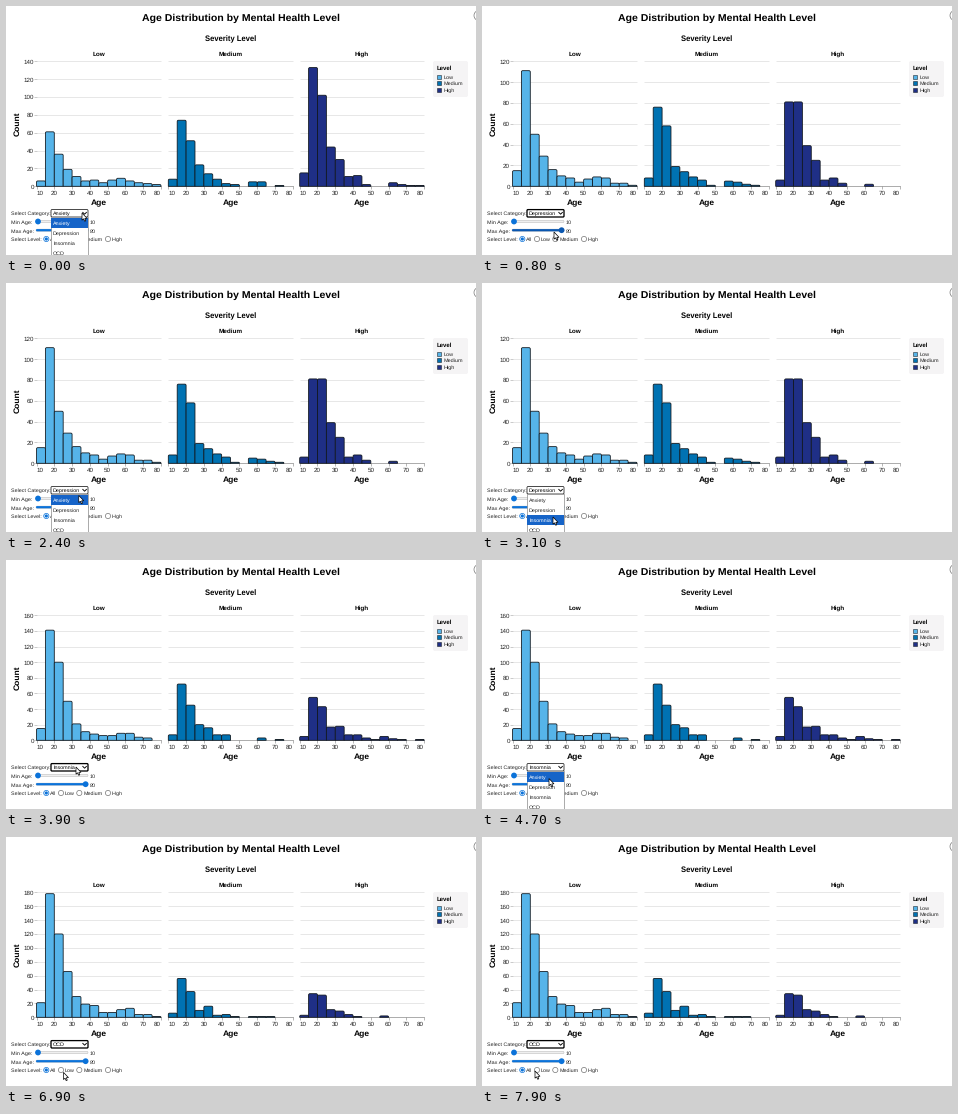
Write a matplotlib script that moves like this. It is 470 px wide and 249 px high and loops after 8 s.

```python
import numpy as np
import matplotlib.pyplot as plt
from matplotlib.animation import FuncAnimation
from matplotlib.collections import LineCollection, PathCollection
from matplotlib.patches import Circle, FancyBboxPatch, Polygon, Rectangle
from matplotlib.path import Path

W, H, DPI = 470, 249, 100
STEP, LOOP = 100, 8000
plt.rcParams.update({"font.family": "Liberation Sans", "text.hinting": "none",
                     "toolbar": "None"})

LEVELS = ["Low", "Medium", "High"]
COLORS = ["#56b4e9", "#0072b2", "#1f2f86"]
PANELS = [30.5, 162.3, 293.7]
PANEL_W, TOP, BASE = 124.5, 55.3, 180.3
BLUE, DARK_BLUE = "#0b72d9", "#0a57b0"

# category: (axis maximum, counts per five-year bin for each level)
DATA = {
    "Anxiety": (140, [[6, 61, 36, 19, 11, 6, 7, 4, 7, 9, 6, 4, 3, 2],
                      [8, 74, 51, 24, 14, 8, 3, 2, 0, 5, 5, 0, 1],
                      [15, 133, 102, 44, 30, 11, 12, 2, 0, 0, 4, 2, 1, 1]]),
    "Depression": (120, [[15, 111, 50, 29, 16, 10, 8, 4, 7, 9, 8, 3, 3, 1],
                         [8, 76, 58, 19, 14, 9, 6, 1, 0, 5, 4, 2, 1],
                         [6, 81, 81, 39, 25, 6, 8, 3, 0, 0, 2]]),
    "Insomnia": (160, [[15, 141, 100, 50, 21, 11, 8, 6, 6, 9, 9, 4, 3],
                       [7, 72, 45, 20, 16, 7, 7, 0, 0, 0, 3, 0, 1],
                       [5, 55, 43, 17, 18, 7, 7, 3, 1, 5, 2, 1, 0, 1]]),
    "OCD": (180, [[21, 178, 120, 66, 30, 19, 17, 7, 7, 11, 13, 4, 4, 1],
                  [6, 56, 37, 10, 16, 3, 4, 1, 0, 1, 1, 1],
                  [3, 34, 32, 11, 9, 4, 1, 0, 0, 2]]),
}
NAMES = list(DATA)

# times (ms) at which the selection changes, and when the list is open
PICKS = [(0, "Anxiety"), (400, "Depression"), (3300, "Insomnia"), (5500, "OCD")]
OPEN = [(0, 400), (2200, 3300), (4200, 5500)]
# pointer path: time, x, y
MOVES = [(0, 76, 207), (100, 76, 208), (300, 74, 224), (400, 73.5, 224),
         (600, 72, 228), (800, 72, 226), (1300, 72, 226), (1900, 73, 207),
         (2200, 73, 207), (2800, 72, 228), (3100, 71, 234), (3300, 71, 234),
         (3900, 70, 207), (4200, 69, 207), (4700, 67, 218.5), (5200, 68, 238),
         (5500, 68, 243), (6200, 68, 243), (7000, 57, 235), (7900, 53, 234)]

fig = plt.figure(figsize=(W / DPI, H / DPI), dpi=DPI, facecolor="white")
ax = fig.add_axes([0, 0, 1, 1])
ax.set(xlim=(0, W), ylim=(H, 0))
ax.axis("off")


def text(x, y, s, size, bold=False, ha="left", color="#222222", z=3):
    """Text with its capitals centred on y; size in pixels."""
    return ax.text(x, y + 0.35 * size, s, size=size * 72 / DPI, ha=ha,
                   va="baseline", color=color, zorder=z,
                   weight="bold" if bold else "normal")


def px(width):
    return width * 72 / DPI


def add(artist):
    ax.add_artist(artist)
    return artist


def rounded(x, y, w, h, r, z=3, **style):
    box = FancyBboxPatch((x, y), w, h, zorder=z,
                         boxstyle=f"round,pad=0,rounding_size={r}", **style)
    return add(box)


def bar_path(x, y, w):
    r = min(1.3, BASE - y)
    verts = [(x, BASE), (x, y + r), (x, y), (x + r, y), (x + w - r, y),
             (x + w, y), (x + w, y + r), (x + w, BASE), (x, BASE)]
    codes = [Path.MOVETO, Path.LINETO, Path.CURVE3, Path.CURVE3, Path.LINETO,
             Path.CURVE3, Path.CURVE3, Path.LINETO, Path.CLOSEPOLY]
    return Path(verts, codes)


def build_chart(top, levels):
    """Grid, tick labels and bars of one category."""
    group = []
    ticks = np.arange(0, top + 1, 20)
    ys = BASE - (BASE - TOP) * ticks / top
    grid = [[(x, y), (x + PANEL_W, y)] for x in PANELS for y in ys]
    marks = [[(28.3, y), (30.5, y)] for y in ys]
    group.append(add(LineCollection(grid, colors="#dedede", linewidths=px(0.7), zorder=1)))
    group.append(add(LineCollection(marks, colors="#999999", linewidths=px(0.5), zorder=1)))
    group += [text(27.8, y + 0.2, str(t), 6.3, ha="right") for t, y in zip(ticks, ys)]
    bw = PANEL_W / 14
    for x0, color, counts in zip(PANELS, COLORS, levels):
        paths = [bar_path(x0 + i * bw, BASE - (BASE - TOP) * n / top, bw)
                 for i, n in enumerate(counts) if n]
        group.append(add(PathCollection(paths, facecolors=color, edgecolors="#10161c",
                                        linewidths=px(0.8), zorder=2)))
    return group


def build_frame():
    """Titles, x axes and legend."""
    text(234.5, 10.8, "Age Distribution by Mental Health Level", 10.45, True, "center", "black")
    text(224.5, 32.2, "Severity Level", 7.6, True, "center", "black")
    add(Circle((473, 9.5), 5, fc="white", ec="#777777", lw=px(0.7)))
    for x0, level in zip(PANELS, LEVELS):
        mid = x0 + PANEL_W / 2
        text(mid, 47.8, level, 6.4, True, "center", "black")
        text(mid, 196.2, "Age", 8.5, True, "center", "black")
        xs = x0 + PANEL_W * np.arange(8) / 7
        ax.plot([x0, x0 + PANEL_W], [BASE, BASE], color="#888888", lw=px(0.6), zorder=1.5)
        add(LineCollection([[(x, BASE), (x, BASE + 2.4)] for x in xs],
                           colors="#888888", linewidths=px(0.6)))
        for i, x in enumerate(xs):
            ha = {0: "left", 7: "right"}.get(i, "center")
            text(x, 187.2, str(10 * i + 10), 6.3, ha=ha)
    ax.text(11.7, 118, "Count", size=px(8.5), weight="bold", rotation=90,
            ha="center", va="center", color="black")
    rounded(427, 55, 35, 36, 2, 1, fc="#f5f4f5", ec="none")
    text(431, 62.2, "Level", 6, True, color="black")
    for i, (level, color) in enumerate(zip(LEVELS, COLORS)):
        y = 70.8 + 6.6 * i
        add(Rectangle((431.2, y - 2), 4, 4, fc=color, ec="#10161c", lw=px(0.5), zorder=3))
        text(438, y, level, 5.5)


def slider(y, label, value, at):
    """Range input; returns the parts that recolour on hover."""
    text(5, y + 0.8, label, 5.5)
    text(83.5, y + 0.8, value, 5.5)
    rounded(30, y - 1.1, 52, 2.2, 1.1, 3, fc="#efefef", ec="#aaaaaa", lw=px(0.4))
    fill = rounded(30, y - 1.1, max(at - 30, 2.3), 2.2, 1.1, 4, fc=BLUE, ec="none")
    return [fill, add(Circle((at, y), 2.9, fc=BLUE, ec="none", zorder=5))]


def radio(x, label, on):
    add(Circle((x, 233), 2.6, fc="white", ec=BLUE if on else "#777777",
               lw=px(0.7), zorder=3))
    if on:
        add(Circle((x, 233), 1.6, fc=BLUE, ec="none", zorder=4))
    text(x + 3.8, 233.2, label, 5.4)


build_frame()
charts = {name: build_chart(*DATA[name]) for name in NAMES}

text(5, 207.3, "Select Category:", 5.35)
select = rounded(45, 203.6, 37, 7.4, 1, fc="white", ec="black")
chosen = text(47, 207.4, "", 5.4, color="black", z=4)
ax.plot([76.8, 78.6, 80.4], [206.4, 208.2, 206.4], color="black", lw=px(0.9), zorder=4)
slider(215.5, "Min Age:", "10", 32)
max_parts = slider(224.2, "Max Age:", "80", 79.6)
text(5, 233.2, "Select Level:", 5.4)
for x, label in zip([40.3, 55, 73.3, 102], ["All"] + LEVELS):
    radio(x, label, label == "All")

menu = [add(Rectangle((45, 211.3), 37, 45, fc="white", ec="#8a8a8a", lw=px(0.7), zorder=6))]
mark = add(Rectangle((45.3, 211.6), 36.4, 9.9, fc="#1664c8", ec="none", zorder=7))
menu.append(mark)
items = [text(47, 216.7 + 10 * i, name, 5.4, z=8) for i, name in enumerate(NAMES)]
menu += items

ARROW = np.array([(0, 0), (0, 7.2), (1.6, 5.8), (2.7, 8.3), (3.8, 7.8),
                  (2.8, 5.4), (5, 5.3)])
pointer = add(Polygon(ARROW, fc="white", ec="black", lw=px(0.7), zorder=10))


def pointer_at(t):
    """Smooth start and stop between the path's points."""
    times, xs, ys = np.array(MOVES, float).T
    i = int(np.clip(np.searchsorted(times, t, "right") - 1, 0, len(times) - 2))
    u = np.clip((t - times[i]) / (times[i + 1] - times[i]), 0, 1)
    u = u * u * (3 - 2 * u)
    return xs[i] + (xs[i + 1] - xs[i]) * u, ys[i] + (ys[i + 1] - ys[i]) * u


def update(k):
    t = k * STEP
    x, y = pointer_at(t)
    current = [name for start, name in PICKS if t >= start][-1]
    is_open = any(a <= t < b for a, b in OPEN)

    for name, group in charts.items():
        for artist in group:
            artist.set_visible(name == current)
    chosen.set_text(current)
    select.set_linewidth(px(0.7 if is_open else 1.3))

    row = NAMES.index(current)
    if y > 211.5:
        row = min(int((y - 211.5) // 10), 3)
    mark.set_y(211.6 + 10 * row)
    for artist in menu:
        artist.set_visible(is_open)
    for i, item in enumerate(items):
        item.set_color("white" if i == row else "#222222")

    hover = not is_open and 30 < x < 83 and 221 < y < 227.5
    for part in max_parts:
        part.set_facecolor(DARK_BLUE if hover else BLUE)
    pointer.set_xy(ARROW + (x, y))
    return []


anim = FuncAnimation(fig, update, frames=LOOP // STEP, interval=STEP,
                     init_func=lambda: [], repeat=True, repeat_delay=0)
plt.show()
```
